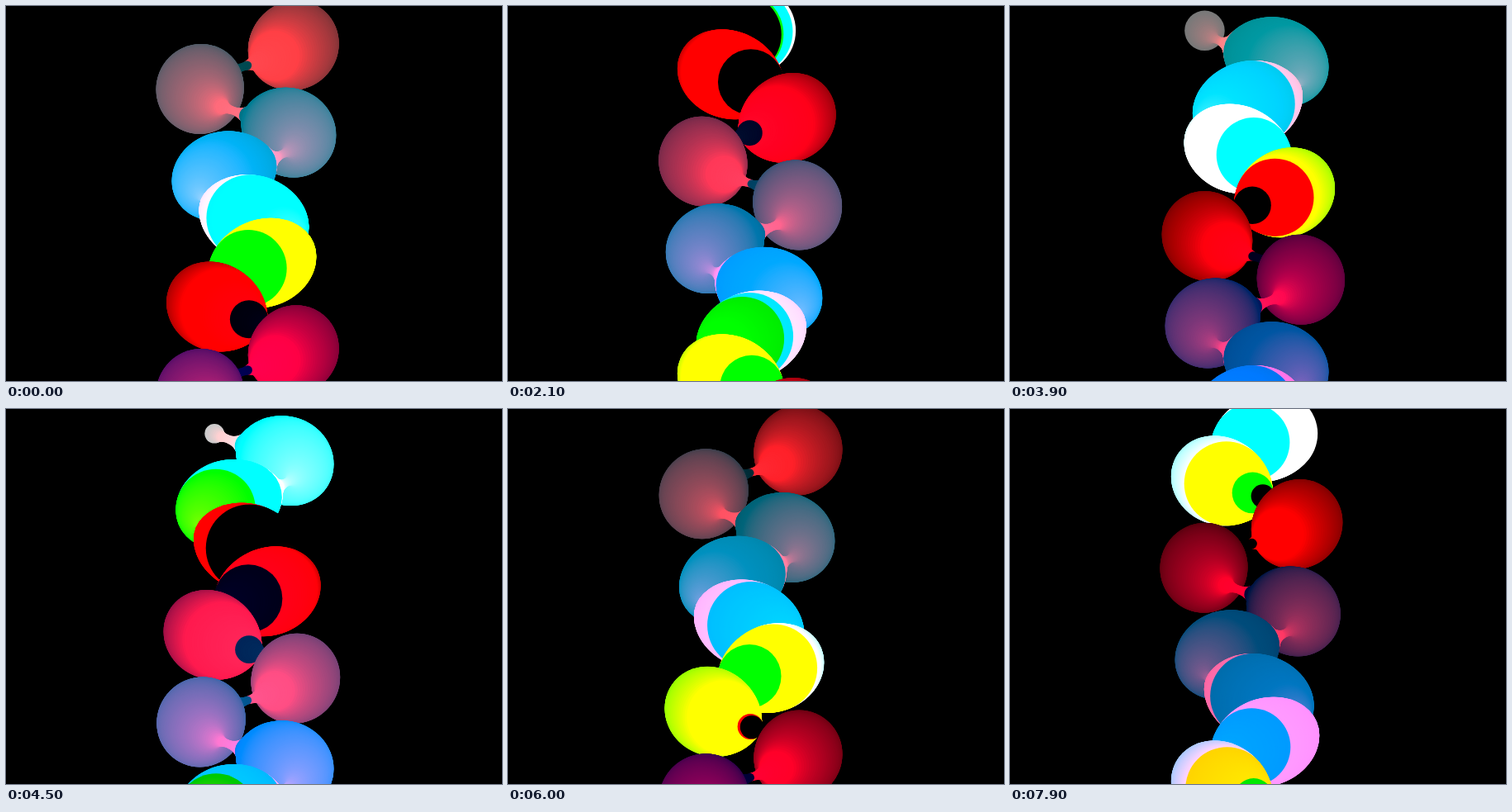
Recreate the animation shown at these times as an HTML page with a canvas. Size 600 px wide and 454 px high, loop 8 s.

```html
<!DOCTYPE html>
<html>
<head>
<meta charset="utf-8">
<title>Twisting ribbon of circles</title>
<style>
html, body { margin: 0; width: 100%; height: 100%; overflow: hidden; background: #000; }
canvas { display: block; }
</style>
</head>
<body>
<canvas width="600" height="454"></canvas>
<script>
const ctx = document.querySelector('canvas').getContext('2d');
const LOOP = 8000, STEP = 100, PHASE = -0.56;

// Each channel ramps up along a tangent and drops abruptly to zero.
const channel = angle => Math.max(0, Math.min(255, Math.round(100 + 100 * Math.tan(angle))));

function draw(t) {
  ctx.fillStyle = '#000';
  ctx.fillRect(0, 0, 600, 454);
  for (let i = 0; i < 840; i++) {
    const u = i / 100;
    const x = 293.3 + 59 * Math.cos(3 * u + t);
    const y = 29.8 + 58.73 * u;
    const r = 29 + 24 * Math.sin(7 * u + t);
    ctx.fillStyle = `rgb(${channel(3 * u + t)},${channel(0.4 * u + t)},${channel(0.5 * u + t)})`;
    ctx.beginPath();
    ctx.arc(x, y, r, 0, 2 * Math.PI);
    ctx.fill();
  }
}

const start = performance.now();
let last = -1;

function tick() {
  const step = Math.floor((performance.now() - start) % LOOP / STEP);
  if (step !== last) draw(PHASE + step / 10);
  last = step;
  requestAnimationFrame(tick);
}
tick();
</script>
</body>
</html>
```
